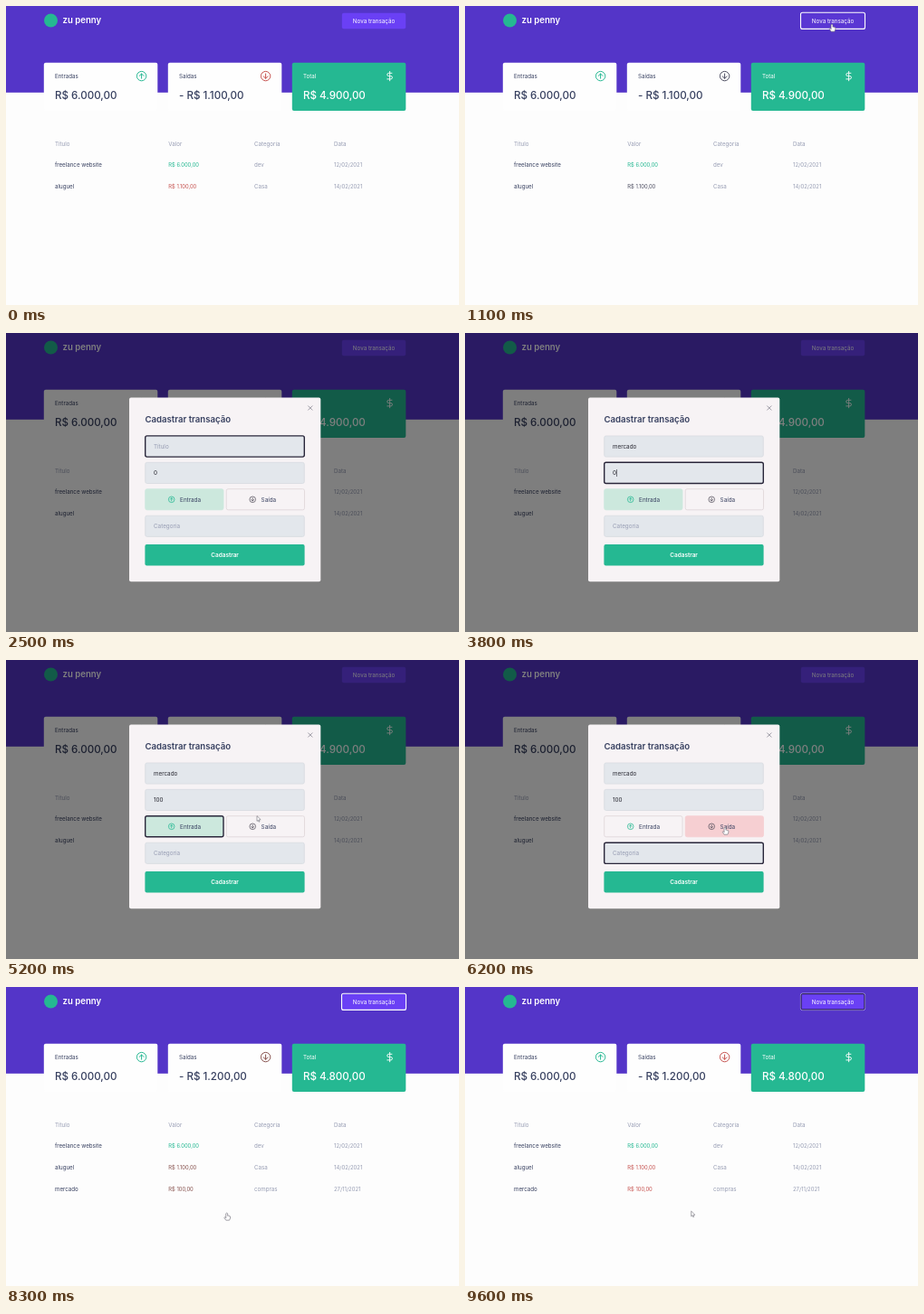
Animation, 500 px wide and 331 px high, one loop 10000 ms. Source, as an HTML page with a canvas:

```html
<!DOCTYPE html>
<html lang="pt-BR">
<head>
<meta charset="utf-8">
<title>Transações</title>
<style>
  html, body { margin: 0; width: 100%; height: 100%; overflow: hidden; background: #fdfdfd; }
  canvas { display: block; width: 100%; height: 100%; }
</style>
</head>
<body>
<canvas id="stage"></canvas>
<script>
const W = 500, H = 331, LOOP = 10000, STEP = 100;
const canvas = document.getElementById('stage');
const ctx = canvas.getContext('2d');
const dpr = window.devicePixelRatio || 1;
canvas.width = W * dpr;
canvas.height = H * dpr;

const C = {
  page: '#fdfdfd', header: '#5435c8', button: '#6a40f5', hover: '#5a37d3',
  green: '#25b892', ink: '#363f5f', soft: '#969cb3', red: '#c6524f',
  modal: '#f7f3f5', field: '#e3e7ec', line: '#d5d9df', focus: '#29263a'
};

// Moments of the story, in ms
const OPEN = 1200, CLOSE = 8300, PICK_OUT = 5500;
const TITLE_KEYS = [2600, 2700, 2900, 3000, 3200, 3300, 3500];
const VALUE_KEYS = [4100, 4200, 4400];
const CATEGORY_KEYS = [6400, 6500, 6600, 6700, 6900, 6900, 7000];
const FOCUS = [[1900, 'title'], [3800, 'value'], [4900, 'in'], [PICK_OUT, 'out'], [6200, 'category'], [7800, 'submit']];

// Pointer strokes: start, end, from, to, visible until
const STROKES = [
  { a: 200, b: 1000, from: [300, 322], to: [405, 20], until: 1300 },
  { a: 1300, b: 1400, from: [405, 20], to: [392, 32], until: 1700 },
  { a: 1700, b: 1900, from: [380, 48], to: [250, 126], until: 1900 },
  { a: 5200, b: 5500, from: [277, 173], to: [287, 185], until: 6400 },
  { a: 7600, b: 7800, from: [268, 212], to: [243.7, 250], until: 9200 },
  { a: 9200, b: 9300, from: [246, 250], to: [249.7, 248.5], until: LOOP }
];

const typed = (word, keys, t) => word.slice(0, keys.filter(k => t >= k).length);
const ease = p => p * p * (3 - 2 * p);

function box(x, y, w, h, fill, r = 2, stroke, lw = 0.7) {
  ctx.beginPath();
  ctx.roundRect(x, y, w, h, r);
  if (fill) { ctx.fillStyle = fill; ctx.fill(); }
  if (stroke) { ctx.strokeStyle = stroke; ctx.lineWidth = lw; ctx.stroke(); }
}

function text(str, x, y, color, size = 6.2, weight = 400, align = 'left') {
  ctx.font = `${weight} ${size}px Inter, "Open Sans", sans-serif`;
  ctx.textAlign = align;
  ctx.textBaseline = 'alphabetic';
  ctx.fillStyle = color;
  ctx.fillText(str, x, y);
  return ctx.measureText(str).width;
}

function path(d, x, y, scale, stroke, lw, fill) {
  ctx.save();
  ctx.translate(x, y);
  ctx.scale(scale, scale);
  ctx.lineCap = ctx.lineJoin = 'round';
  const p = new Path2D(d);
  if (fill) { ctx.fillStyle = fill; ctx.fill(p); }
  ctx.strokeStyle = stroke;
  ctx.lineWidth = lw / scale;
  ctx.stroke(p);
  ctx.restore();
}

function disc(x, y, r, color) {
  ctx.beginPath();
  ctx.arc(x, y, r, 0, Math.PI * 2);
  ctx.fillStyle = color;
  ctx.fill();
}

function arrowIcon(x, y, r, up, color, lw) {
  ctx.beginPath();
  ctx.arc(x, y, r, 0, Math.PI * 2);
  ctx.strokeStyle = color;
  ctx.lineWidth = lw;
  ctx.stroke();
  path(up ? 'M0 5V-5M-4.5 -.5L0 -5L4.5 -.5' : 'M0 -5V5M-4.5 .5L0 5L4.5 .5', x, y, r / 10, color, lw);
}

const dollar = (x, y) =>
  path('M0 -11V11M5 -7H-2.5A3.5 3.5 0 0 0 -2.5 0H2.5A3.5 3.5 0 0 1 2.5 7H-6', x, y, 0.47, '#fff', 0.9);

function card(x, label, amount, fill, color) {
  box(x, 62.7, 125.5, 53.4, fill);
  text(label, x + 12.2, 80, color);
  text(amount, x + 12.2, 102.8, color, 11.6, 500);
}

// The expense red goes dull around the moments the page changes
function redAt(t) {
  if (t >= 200 && t < OPEN) return '#4c4d60';
  if (t >= CLOSE && t < 8700) return '#86504c';
  return C.red;
}

function drawButton(t) {
  const over = t >= 900 && t < OPEN;
  box(370.8, 7.8, 70.4, 17.4, over ? C.hover : C.button);
  const white = (t >= 1100 && t < OPEN) || (t >= CLOSE && t < 8700);
  if (white) box(370.5, 7.2, 71, 18.2, null, 2, '#fff', 1.1);
  else if (t >= 8700) {
    box(370.4, 7, 71.2, 18.6, null, 2, '#c9c2ee', 0.7);
    box(371.1, 7.7, 69.8, 17.2, null, 1.6, '#1d1730', 0.9);
  }
  text('Nova transação', 406, 18.6, '#fff', 6.25, 400, 'center');
}

function drawPage(t) {
  const done = t >= CLOSE, red = redAt(t);
  ctx.fillStyle = C.page;
  ctx.fillRect(0, 0, W, H);
  ctx.fillStyle = C.header;
  ctx.fillRect(0, 0, W, 95.8);

  disc(49.5, 16, 7.5, C.green);
  text('zu penny', 62.5, 19.2, '#fff', 9.6, 600);
  drawButton(t);

  card(41.8, 'Entradas', 'R$ 6.000,00', '#fefefe', C.ink);
  card(178.8, 'Saídas', done ? '- R$ 1.200,00' : '- R$ 1.100,00', '#fefefe', C.ink);
  card(315.8, 'Total', done ? 'R$ 4.800,00' : 'R$ 4.900,00', C.green, '#fff');
  arrowIcon(149.6, 77.6, 5.2, true, C.green, 1);
  arrowIcon(286.6, 77.6, 5.2, false, red, 1);
  dollar(423.6, 77.6);

  const cols = [54, 179.3, 274, 362];
  ['Título', 'Valor', 'Categoria', 'Data'].forEach((s, i) => text(s, cols[i], 154.6, C.soft));
  const rows = [
    ['freelance website', 'R$ 6.000,00', 'dev', '12/02/2021', C.green],
    ['aluguel', 'R$ 1.100,00', 'Casa', '14/02/2021', red]
  ];
  if (done) rows.push(['mercado', 'R$ 100,00', 'compras', '27/11/2021', red]);
  rows.forEach(([name, value, kind, date, color], i) => {
    const y = 178.3 + i * 23.9;
    text(name, cols[0], y, C.ink);
    text(value, cols[1], y, color, 5.8);
    text(kind, cols[2], y, C.soft);
    text(date, cols[3], y, C.soft, 5.95);
  });
}

function field(y, value, hint, focused) {
  box(153.7, y, 175.6, 23.2, C.field, 2, focused ? C.focus : C.line, focused ? 1.4 : 0.7);
  const w = text(value || hint, 163, y + 14, value ? '#26262f' : C.soft, 6.3);
  if (focused && value) {
    ctx.fillStyle = '#26262f';
    ctx.fillRect(163.4 + w, y + 7.7, 0.6, 8);
  }
}

function choice(x, label, up, picked, fill, focused) {
  box(x, 172.7, 86.3, 23.1, picked ? fill : C.modal, 2,
    focused ? C.focus : picked ? fill : '#ddd5d7', focused ? 1.4 : 0.8);
  arrowIcon(x + 29, 184.3, 3.3, up, up ? C.green : '#55505c', 0.75);
  text(label, x + 38.4, 186.5, C.ink, 6.3);
}

function drawModal(t) {
  ctx.fillStyle = 'rgba(0,0,0,.5)';
  ctx.fillRect(0, 0, W, H);
  const focus = FOCUS.reduce((now, [at, name]) => t >= at ? name : now, '');
  const out = t >= PICK_OUT;

  box(136, 71.5, 211.3, 203.7, C.modal, 2);
  path('M-2.2 -2.2L2.2 2.2M2.2 -2.2L-2.2 2.2', 335.8, 83, 1, '#85838f', 0.8);
  text('Cadastrar transação', 153.5, 98.8, C.ink, 9.6, 600);
  field(113.9, typed('mercado', TITLE_KEYS, t), 'Título', focus === 'title');
  field(143.3, typed('100', VALUE_KEYS, t) || '0', '', focus === 'value');
  choice(153.7, 'Entrada', true, !out, '#cce8dd', focus === 'in');
  choice(243.2, 'Saída', false, out, '#f6cfd2', focus === 'out');
  field(202.2, typed('compras', CATEGORY_KEYS, t), 'Categoria', focus === 'category');
  box(153.4, 234, 176.2, 23.6, t >= 7700 ? '#22a884' : C.green);
  text('Cadastrar', 241.6, 248.2, '#fff', 6.4, 600, 'center');
}

function drawPointer(t) {
  const s = STROKES.find(k => t >= k.a && t < k.until);
  if (!s) return;
  const p = ease(Math.min(1, (t - s.a) / (s.b - s.a)));
  const x = s.from[0] + (s.to[0] - s.from[0]) * p;
  const y = s.from[1] + (s.to[1] - s.from[1]) * p;
  const hand = (t >= 900 && t < OPEN) || (t >= 5400 && t < 6400) || (t >= 7700 && t < 9200);
  if (hand) {
    path('M-1 5V.8Q0 -.6 1 .8V3.5Q2 2.8 2.6 3.8Q3.6 3.2 4 4.2V6.4L3 8.6H-1L-3 5.6Q-2.6 4.4 -1 5.6Z',
      x, y, 0.95, '#66646f', 0.6, '#fff');
  } else {
    path('M0 0V6L1.4 4.8L2.3 6.9L3.3 6.5L2.4 4.4L4.2 4.2Z', x, y, 0.9, '#6c6a75', 0.6, '#fff');
  }
}

function frame(now) {
  const t = Math.floor((now % LOOP) / STEP) * STEP;
  ctx.setTransform(canvas.width / W, 0, 0, canvas.height / H, 0, 0);
  drawPage(t);
  if (t >= OPEN && t < CLOSE) drawModal(t);
  drawPointer(t);
}

const start = performance.now();
function tick() {
  frame(performance.now() - start);
  requestAnimationFrame(tick);
}
tick();
</script>
</body>
</html>
```
